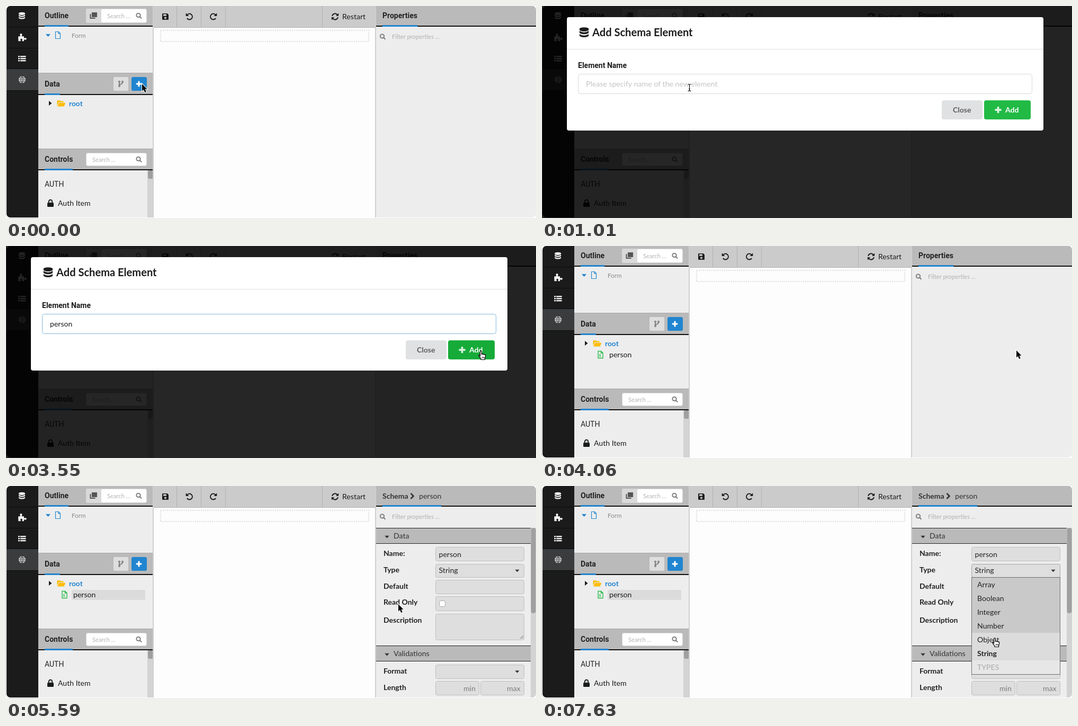
These frames come from a looping animation (1001 by 400 pixels, 8 s). An HTML page with a canvas:

```html
<!DOCTYPE html>
<html lang="en">
<head>
<meta charset="utf-8">
<title>Schema editor</title>
<style>
html, body { margin: 0; width: 100%; height: 100%; overflow: hidden; background: #fff; }
canvas { display: block; }
</style>
</head>
<body>
<canvas id="stage" width="1001" height="400"></canvas>
<script>
const ctx = document.getElementById('stage').getContext('2d');
const LOOP = 8000;
const INK = '#1b1c1d', BLUE = '#2185d0', BAR = '#bababa', PANEL = '#ededed', FIELD = '#dedede';
const LATO = 'Lato, sans-serif', ROBOTO = 'Roboto, sans-serif';

// Each step holds until the next; later keys override earlier ones.
const steps = [
  [0, { cur: ['arrow', 257, 147] }],
  [500, { cur: ['arrow', 258, 148] }],
  [1010, { modal: true, cur: ['beam', 278, 154] }],
  [1520, { focus: true, caret: true }],
  [2030, { typed: 'p' }],
  [2530, { typed: 'perso' }],
  [3040, { typed: 'person', cur: ['arrow', 443, 170] }],
  [3550, { caret: false, hover: true, cur: ['hand', 897, 198] }],
  [4060, { modal: false, item: true, cur: ['arrow', 896, 197] }],
  [4570, { cur: ['arrow', 242, 165] }],
  [5080, { cur: ['hand', 141, 207] }],
  [5590, { props: true, cur: ['arrow', 741, 223] }],
  [6100, { cur: ['hand', 870, 170] }],
  [6610, { open: true, cur: ['hand', 868, 164] }],
  [7120, { row: 2, cur: ['hand', 861, 253] }],
  [7630, { row: 4, cur: ['hand', 855, 287] }]
];

function stateAt(t) {
  const s = { typed: '', row: -1 };
  for (const [at, change] of steps) if (t >= at) Object.assign(s, change);
  return s;
}

function rect(x, y, w, h, color) {
  ctx.fillStyle = color;
  ctx.fillRect(x, y, w, h);
}

function box(x, y, w, h, r, fill, border) {
  const d = border ? 0.5 : 0;
  ctx.beginPath();
  ctx.roundRect(x + d, y + d, w - 2 * d, h - 2 * d, r);
  ctx.fillStyle = fill;
  ctx.fill();
  if (border) {
    ctx.lineWidth = 1;
    ctx.strokeStyle = border;
    ctx.stroke();
  }
}

function text(str, x, y, { size = 14.1, bold = false, color = INK, face = LATO } = {}) {
  ctx.font = `${bold ? 'bold ' : ''}${size}px ${face}`;
  ctx.fillStyle = color;
  ctx.fillText(str, x, y);
}

// Path drawn around (x, y); filled, or stroked when a line width is given.
function icon(d, x, y, color, width = 0, scale = 1) {
  ctx.save();
  ctx.translate(x, y);
  ctx.scale(scale, scale);
  const p = new Path2D(d);
  if (width) {
    ctx.lineWidth = width;
    ctx.strokeStyle = color;
    ctx.stroke(p);
  } else {
    ctx.fillStyle = color;
    ctx.fill(p);
  }
  ctx.restore();
}

const DISC = 'M-6 -4.6A6 2.2 0 0 1 6 -4.6V-3.6A6 2.2 0 0 1 -6 -3.6Z';
const BAND = 'M-6 -2Q0 1.8 6 -2V0A6 2.2 0 0 1 -6 0Z';
const PUZZLE = 'M-7 -2h4c1-1-1-2-.5-3.5a2.3 2.3 0 0 1 4.6 0c.2 1.5-1.5 2.5-.5 3.5H5v3.5c1 1 2-.5 3-.5' +
  'a2.2 2.2 0 0 1 0 4.4c-1 0-2-1.5-3-.4v3h-4c-1-1 .8-2 .5-3a2 2 0 0 0-4 0c0 1.2 1.3 2 .4 3H-7Z';
const GRID = 'M-6.5 0H6.5M0 -6.5V6.5M-5.5 -3.2H5.5M-5.5 3.2H5.5M0 -6.5C-4.4 -3 -4.4 3 0 6.5C4.4 3 4.4 -3 0 -6.5';
const LENS = 'M2.7 -1A3.7 3.7 0 1 1 -4.7 -1A3.7 3.7 0 1 1 2.7 -1M1.7 1.7L5 5';
const FILE = 'M-4.5 -6.5H1.2L4.5 -3.2V6.5H-4.5ZM1 -6.3V-3H4.3';
const FOLDER = 'M-7.5 4V-5L-6.5 -6H-2.5L-1 -4.5H4.5V-2.2H-4.2ZM-3.6 -1.2H8.5L5.5 5.5H-7Z';
const PLUS = 'M-1.6 -5.5H1.6V-1.6H5.5V1.6H1.6V5.5H-1.6V1.6H-5.5V-1.6H-1.6Z';
const TURN = 'M-4.6 -3A5.5 5.5 0 1 1 -4.6 3.1';
const TURN_HEAD = 'M-6.8 -6.8V-1H-1Z';
const DOWN = 'M-4.5 -2.5H4.5L0 2.5Z';
const ARROW = 'M0 0V13.4L3 10.7L5.2 16L7.7 15L5.5 9.8H9.6Z';
const HAND = 'M-1.5 9.5V1.3A1.4 1.4 0 0 1 1.3 1.3V6.2C2 5 3.8 5.2 4 6.6C4.8 5.6 6.3 6 6.5 7.2C7.4 6.5 8.7 7 8.7 8.3' +
  'C8.8 11 8 12.5 7.4 14V16.5H0V14.6C-1.5 13 -3 11 -4.2 9.2C-4.9 8 -3.4 7 -2.4 8.2Z';

function database(x, y, color, scale) {
  icon(DISC, x, y, color, 0, scale);
  icon(BAND, x, y, color, 0, scale);
  icon(BAND, x, y + 4 * scale, color, 0, scale);
}

function sidebar() {
  rect(0, 0, 61, 400, '#1b1b1b');
  rect(0, 119, 61, 40, '#3a3c3e');
  for (const y of [39, 79, 118, 159]) rect(0, y, 61, 1, '#0c0c0c');
  const c = '#f4f4f4';
  database(30, 18.5, c, 1);
  icon(PUZZLE, 29.5, 59, c, 0, 0.9);
  for (const y of [94, 98, 102]) {
    rect(23, y, 3, 2.4, c);
    rect(27, y, 10.5, 2.4, c);
  }
  icon('M6.5 0A6.5 6.5 0 1 1 -6.5 0A6.5 6.5 0 1 1 6.5 0', 30.5, 139, c);
  icon(GRID, 30.5, 139, '#3a3c3e', 1);
}

function header(label, x, y, w, h, underline) {
  rect(x, y, w, h, BAR);
  rect(x, y + h - 2, w, 2, '#111');
  rect(x + 12, y + h - 3, underline, 3, BLUE);
  if (label) text(label, x + 12, y + h - 16, { size: 14, bold: true, face: ROBOTO, color: '#222' });
}

function search(x, y, w, h) {
  box(x, y, w, h, 3, '#fff', '#d8d8d8');
  text('Search ...', x + 12, y + h / 2 + 4, { size: 11.2, color: '#b4b4b4' });
  icon(LENS, 251, y + h / 2, '#777', 1.8);
}

function leftPanels(s) {
  rect(61, 0, 217, 400, PANEL);

  header('Outline', 61, 0, 217, 39, 45);
  box(151, 5, 32, 27, 3, '#d9d9d9');
  rect(162, 12, 10, 9, '#555');
  icon('M-5 -3V5H4', 164.5, 18, '#555', 2);
  search(179, 5, 87, 27);
  icon(DOWN, 79.5, 55.5, BLUE);
  icon(FILE, 98, 55, BLUE, 1.2);
  text('Form', 124, 60, { size: 11.7, color: '#8a8a8a' });

  rect(61, 126, 217, 1, '#a9a9a9');
  header('Data', 61, 127, 217, 41, 29);
  box(203, 134, 28, 26, 3, '#dedede');
  icon('M-3 -2.5V3M3 -2.5C3 1 -3 0 -3 3', 217, 147, '#555', 1.3);
  for (const [x, y] of [[214, 143], [220, 143], [214, 151]])
    icon('M1.5 0A1.5 1.5 0 1 1 -1.5 0A1.5 1.5 0 1 1 1.5 0', x, y, '#555', 1);
  box(237, 134, 29, 26, 3, BLUE);
  icon(PLUS, 251, 147, '#fff', 0, 0.95);
  icon('M-2.5 -4.5L3 0L-2.5 4.5Z', 83.5, 183.5, INK);
  icon(FOLDER, 104, 184, '#fbbd08');
  text('root', 119, 189, { size: 13.8, bold: true, color: BLUE });
  if (s.item) {
    if (s.props) box(124, 196, 139, 19, 3, '#dbdbdb');
    icon(FILE, 110.5, 205, '#21ba45', 1.3);
    text('s', 107.6, 209, { size: 9, bold: true, color: '#21ba45' });
    text('person', 127, 210);
  }

  rect(61, 269, 217, 1, '#a9a9a9');
  header('Controls', 61, 270, 217, 40, 53);
  search(151, 277, 115, 25);
  text('AUTH', 73, 341, { size: 14, face: ROBOTO, color: '#222' });
  box(78, 371, 12, 8, 1.5, INK);
  icon('M-3.2 6V2.5A3.2 3.2 0 0 1 3.2 2.5V6', 84, 366.5, INK, 1.9);
  text('Auth Item', 98, 377);
  rect(267, 310, 11, 90, '#d4d4d4');
  box(268, 310, 10, 16, 3, '#a0a0a0');
}

function canvasArea() {
  rect(278, 0, 421, 400, '#fdfdfd');
  rect(279, 0, 418, 40, '#cbcbcb');
  rect(279, 40, 418, 1, '#b2b2b2');
  for (const x of [322, 368, 414, 597]) rect(x, 0, 1, 40, '#b2b2b2');
  icon('M-6 -5Q-6 -6 -5 -6H3.5L6 -3.5V5Q6 6 5 6H-5Q-6 6 -6 5Z', 301, 20, INK);
  rect(297, 15.5, 6, 3.2, '#cbcbcb');
  icon('M2 0A2 2 0 1 1 -2 0A2 2 0 1 1 2 0', 301, 22.5, '#cbcbcb');
  icon(TURN, 346.5, 20, INK, 1.9);
  icon(TURN_HEAD, 346.5, 20, INK);
  ctx.save();
  ctx.translate(391.5, 20);
  ctx.scale(-1, 1);
  icon(TURN, 0, 0, INK, 1.9);
  icon(TURN_HEAD, 0, 0, INK);
  ctx.restore();
  for (const side of [1, -1]) {
    ctx.save();
    ctx.translate(621.5, 20);
    ctx.scale(side, side);
    icon('M-5.4 -1.2A5.4 5.4 0 0 1 4.3 -3.4', 0, 0, INK, 1.9);
    icon('M6.6 -6.4V-1.2H1.4Z', 0, 0, INK);
    ctx.restore();
  }
  text('Restart', 635, 25);
  ctx.setLineDash([2, 2]);
  ctx.lineWidth = 2;
  ctx.strokeStyle = '#dcdcdc';
  ctx.strokeRect(292, 46, 393, 21);
  ctx.setLineDash([]);
  rect(277, 0, 2, 400, '#cfcfcf');
  rect(697, 0, 2, 400, '#cfcfcf');
}

function section(label, y) {
  rect(699, y, 292, 30, BAR);
  rect(699, y, 292, 1, '#222');
  rect(699, y + 29, 292, 1, '#222');
  icon(DOWN, 719.5, y + 17, '#333', 0, 0.95);
  text(label, 732, y + 20, { color: '#333' });
}

function field(y, h, x = 811, w = 168) {
  box(x, y, w, h, 3, FIELD, '#bebebe');
}

function dropdown(hover) {
  box(811, 147, 168, 26, 3, FIELD, '#a5a5a5');
  rect(811, 172, 168, 184, '#6e6e6e');
  rect(812, 173, 166, 182, '#c9c9c9');
  ['Array', 'Boolean', 'Integer', 'Number', 'Object', 'String', 'TYPES'].forEach((name, i) => {
    const y = 173 + 26 * i, last = i === 6, chosen = i === 5;
    if (last || chosen || i === hover) rect(812, y, 166, 26, last ? '#e7e7e7' : '#dcdcdc');
    text(name, 822, y + 18, { bold: chosen, color: last ? '#a9a9a9' : '#222' });
  });
}

function properties(s) {
  rect(699, 0, 302, 400, PANEL);
  header(s.props ? '' : 'Properties', 699, 0, 302, 39, s.props ? 111 : 66);
  icon(LENS, 711.5, 58, '#777', 1.8);
  text('Filter properties ...', 729, 62, { size: 11.2, color: '#b0b0b0' });
  if (!s.props) return;

  text('Schema', 711, 24, { size: 14, bold: true, color: '#333' });
  icon('M-2.5 -5L2.5 0L-2.5 5', 767, 19, '#333', 2.6);
  text('person', 780, 24, { color: '#333' });
  section('Data', 79);
  section('Validations', 301);
  const labels = { 'Name:': 132, Type: 163, Default: 194, 'Read Only': 224, Description: 258, Format: 354, Length: 385 };
  for (const name in labels) text(name, 713, labels[name], { size: 14, bold: true, color: '#222' });

  field(115, 27);
  text('person', 817.5, 134, { color: '#222' });
  field(147, 26);
  field(177, 27);
  field(208, 28);
  box(818, 216, 12, 12, 3, '#fff', '#a6a6a6');
  field(241, 50);
  icon('M-6 0L0 -6M-3 0L0 -3', 977, 288, '#777', 1);
  field(337, 27);
  icon(DOWN, 965.5, 350.5, '#333', 0, 0.9);
  field(368, 27, 811, 83);
  field(368, 27, 896, 83);
  text('min', 864, 387, { color: '#7c7c7c' });
  text('max', 946, 387, { color: '#7c7c7c' });
  if (s.open) dropdown(s.row);
  text('String', 817.5, 164, { color: '#222' });
  icon(DOWN, 965.5, 160, '#333', 0, 0.9);

  rect(991, 79, 10, 321, '#d3d3d3');
  box(991.5, 79, 9, 161, 4, '#a0a0a0');
}

function modal(s) {
  rect(0, 0, 1001, 400, 'rgba(0,0,0,.85)');
  box(47, 21, 900, 214, 4, '#fff');
  rect(47, 81, 900, 1, '#dcdcdc');
  database(79.5, 50, INK, 1.45);
  text('Add Schema Element', 95, 57, { size: 20.1, bold: true });
  text('Element Name', 68, 117, { size: 14, bold: true, face: ROBOTO });
  box(68, 128, 858, 38, 4, '#fff', s.focus ? '#85b7d9' : '#d9d9d9');
  if (s.typed) text(s.typed, 83, 152);
  else text('Please specify name of the new element', 83, 152, { color: s.focus ? '#999' : '#c3c3c3' });
  if (s.caret) {
    ctx.font = `14.1px ${LATO}`;
    rect(Math.round(83 + ctx.measureText(s.typed).width), 138, 1, 17, '#222');
  }
  box(755, 178, 77, 36, 4, '#e0e1e2');
  text('Close', 776, 201, { size: 14, bold: true, color: '#5f6061' });
  box(835, 178, 88, 36, 4, s.hover ? '#16ab39' : '#21ba45');
  icon(PLUS, 861.5, 196, 'rgba(255,255,255,.85)', 0, 1.1);
  text('Add', 875, 201, { size: 14, bold: true, color: '#fff' });
}

function cursor([kind, x, y]) {
  if (kind === 'arrow') {
    icon(ARROW, x, y, '#fff', 2);
    icon(ARROW, x, y, '#000');
  } else if (kind === 'hand') {
    icon(HAND, x, y, '#fff');
    icon(HAND, x, y, '#000', 1.2);
    icon('M2.4 11V14M4.3 11V14M6.1 11V14', x, y, '#000', 0.8);
  } else {
    const beam = 'M-3 -6.5Q0 -6.5 0 -4.5Q0 -6.5 3 -6.5M0 -4.5V4.5M-3 6.5Q0 6.5 0 4.5Q0 6.5 3 6.5M-1.5 2.5H1.5';
    icon(beam, x + 0.5, y, '#fff', 2.6);
    icon(beam, x + 0.5, y, '#111', 1.2);
  }
}

function draw(now) {
  const s = stateAt(now % LOOP);
  rect(0, 0, 1001, 400, '#fff');
  ctx.save();
  ctx.beginPath();
  ctx.roundRect(1, 0, 1000, 399, 7);
  ctx.clip();
  sidebar();
  leftPanels(s);
  canvasArea();
  properties(s);
  ctx.restore();
  if (s.modal) modal(s);
  cursor(s.cur);
}

const start = performance.now();
function tick() {
  draw(performance.now() - start);
  requestAnimationFrame(tick);
}
tick();
</script>
</body>
</html>
```
